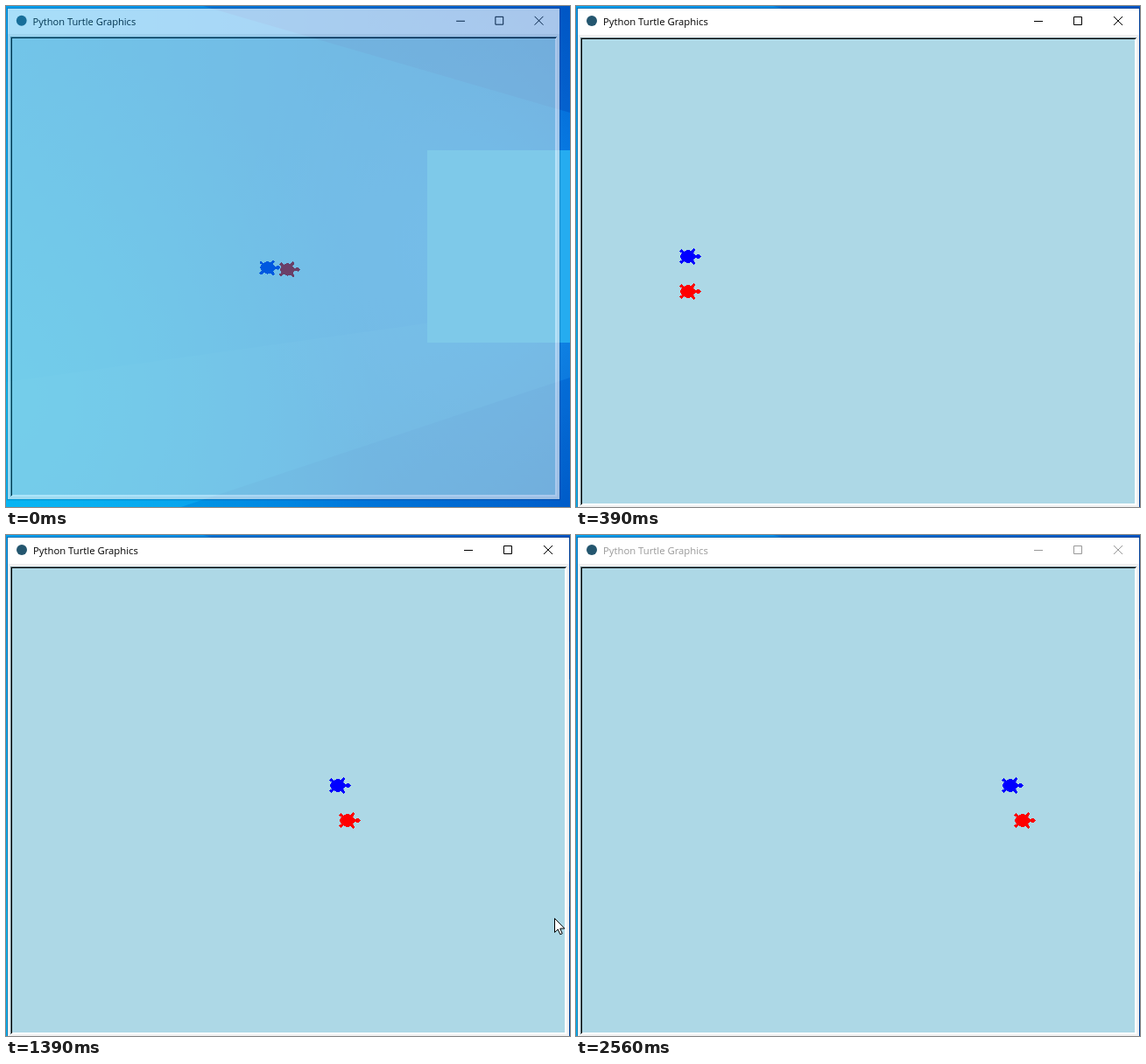
These frames come from a looping animation (644x573 px, 2710 ms). An HTML page:

```html
<!DOCTYPE html>
<html lang="en">
<head>
<meta charset="utf-8">
<title>Turtle race</title>
<style>
  html, body { margin: 0; width: 100%; height: 100%; overflow: hidden; background: #0078d7; }
  svg { display: block; width: 644px; height: 573px; }
  .title { font: 11.3px "Open Sans", "Noto Sans", sans-serif; }
  .crisp { shape-rendering: crispEdges; }
</style>
</head>
<body>
<svg viewBox="0 0 644 573" xmlns="http://www.w3.org/2000/svg">
  <defs>
    <linearGradient id="sky">
      <stop offset="0" stop-color="#00a0ee"/>
      <stop offset=".5" stop-color="#0087e6"/>
      <stop offset="1" stop-color="#0060cd"/>
    </linearGradient>
    <radialGradient id="cyan" gradientUnits="userSpaceOnUse" cx="0" cy="450" r="420">
      <stop offset="0" stop-color="#00c0f5" stop-opacity=".75"/>
      <stop offset="1" stop-color="#00c0f5" stop-opacity="0"/>
    </radialGradient>
    <radialGradient id="glow" gradientUnits="userSpaceOnUse" cx="560" cy="275" r="300">
      <stop offset="0" stop-color="#129cff" stop-opacity=".7"/>
      <stop offset="1" stop-color="#129cff" stop-opacity="0"/>
    </radialGradient>
    <path id="turtle" class="crisp" stroke-width="1" stroke="currentColor" fill="currentColor"/>
  </defs>

  <g id="wallpaper">
    <rect width="644" height="573" fill="url(#sky)"/>
    <rect width="644" height="573" fill="url(#cyan)"/>
    <rect width="644" height="573" fill="url(#glow)"/>
    <path d="M225 0H644V122Z" fill="#0038a8" opacity=".28"/>
    <path d="M0 430L644 340V425L200 573H0Z" fill="#60e0ff" opacity=".07"/>
    <path d="M644 425V573H200Z" fill="#0040a8" opacity=".12"/>
    <rect x="481" y="165" width="220" height="220" fill="#25acf0"/>
  </g>

  <g id="win">
    <rect x="1.5" y="2.5" width="642" height="572" fill="none" stroke="#001446" stroke-opacity=".35"/>
    <g class="crisp">
      <rect x="2" y="3" width="641" height="571" fill="#f0f0f0"/>
      <rect x="2" y="3" width="641" height="30" fill="#fff"/>
      <rect x="5" y="36" width="635" height="535" fill="#fff"/>
      <path d="M5 571V36H640V37H6V571Z" fill="#67818a"/>
      <path d="M6 570V37H639V38H7V570Z" fill="#000"/>
      <rect x="7" y="38" width="631" height="531" fill="#add8e6"/>
    </g>
    <circle cx="18" cy="17" r="6" fill="#24566f"/>
    <g id="caption" color="#000">
      <text class="title" x="31" y="22" fill="currentColor">Python Turtle Graphics</text>
      <g fill="none" stroke="currentColor">
        <path d="M523 17.5H533M568.5 12.5H577.5V21.5H568.5Z"/>
        <path d="M614 12L624 22M624 12L614 22"/>
      </g>
    </g>
  </g>

  <g id="racers">
    <use id="red" href="#turtle"/>
    <use id="blue" href="#turtle"/>
  </g>
  <path id="cursor" d="M.5 .5V16.5L4.2 13L6.8 18.8L9.2 17.8L6.7 12.1H11.8Z" fill="#fff" stroke="#000" visibility="hidden"/>
</svg>
<script>
const LOOP = 2710, BLUR = 2560; // ms; the window loses focus at BLUR
const STEP = 77.2, LEAD = 5;    // ms per redraw, and how early it lands
const LAST = 25;                // step at which the race ends
const HOME = [325, 306], GATE = 125;

const $ = id => document.getElementById(id);
const clamp = v => Math.min(1, Math.max(0, v));
const mix = (a, b, k) => a + (b - a) * k;

// walk: share of the way from home to the gate; race: [step, x] key points
const racers = [
  { id: "blue", lane: 286, tint: [0, 88, 224], color: [0, 0, 255],
    walk: n => clamp(.115 + .32 * n + .033 * n * n),
    race: [[5, 126], [9, 188], [18, 377], [LAST, 494]] },
  { id: "red", lane: 326, tint: [107, 64, 104], color: [255, 0, 0],
    walk: n => clamp((n - 2.3) / 2.6),
    race: [[5, 126], [9, 216], [18, 388], [LAST, 508]] }
];

// Right half of the turtle, mirrored for the other side; it heads east
const half = [[16, 0], [14, 2], [10, 1], [7, 4], [9, 7], [8, 9], [5, 6], [1, 7],
  [-3, 5], [-6, 8], [-8, 6], [-5, 4], [-7, 0]];
const mirror = half.slice(1, -1).reverse().map(([x, y]) => [x, -y]);
$("turtle").setAttribute("d", "M" + half.concat(mirror).join("L") + "Z");

function along(keys, n) {
  const i = Math.max(1, keys.findIndex(k => k[0] >= n));
  const [a, b] = [keys[i - 1], keys[i]];
  return mix(a[1], b[1], (n - a[0]) / (b[0] - a[0]));
}

function place({ lane, walk, race }, n) {
  const k = walk(n);
  const x = n < race[0][0] ? mix(HOME[0], GATE, k) : along(race, n);
  return [x, mix(HOME[1], lane, k)].map(Math.round);
}

function draw(n, focused) {
  // The window fades and grows in over two steps
  const left = clamp(1 - n / 2);
  const zoom = `translate(2 3) scale(${1 - .017 * left}) translate(-2 -3)`;
  $("win").setAttribute("transform", zoom);
  $("win").setAttribute("opacity", 1 - .34 * left ** 1.2);
  $("racers").setAttribute("transform", zoom);

  for (const r of racers) {
    const [x, y] = place(r, n);
    const rgb = r.color.map((c, i) => Math.round(mix(c, r.tint[i], left)));
    $(r.id).setAttribute("transform", `translate(${x + .5} ${y + .5})`);
    $(r.id).setAttribute("color", `rgb(${rgb})`);
  }
  $("caption").setAttribute("color", focused ? "#000" : "#999");

  // The pointer passes along the right edge
  const pass = n - 18;
  $("cursor").setAttribute("visibility", pass === 0 || pass === 1 ? "visible" : "hidden");
  $("cursor").setAttribute("transform", `translate(${626 + 7 * pass} ${438 + 102 * pass})`);
}

const start = performance.now();
function frame() {
  const t = (performance.now() - start) % LOOP;
  draw(Math.min(LAST, Math.floor((t + LEAD) / STEP)), t < BLUR);
  requestAnimationFrame(frame);
}
frame();
</script>
</body>
</html>
```
